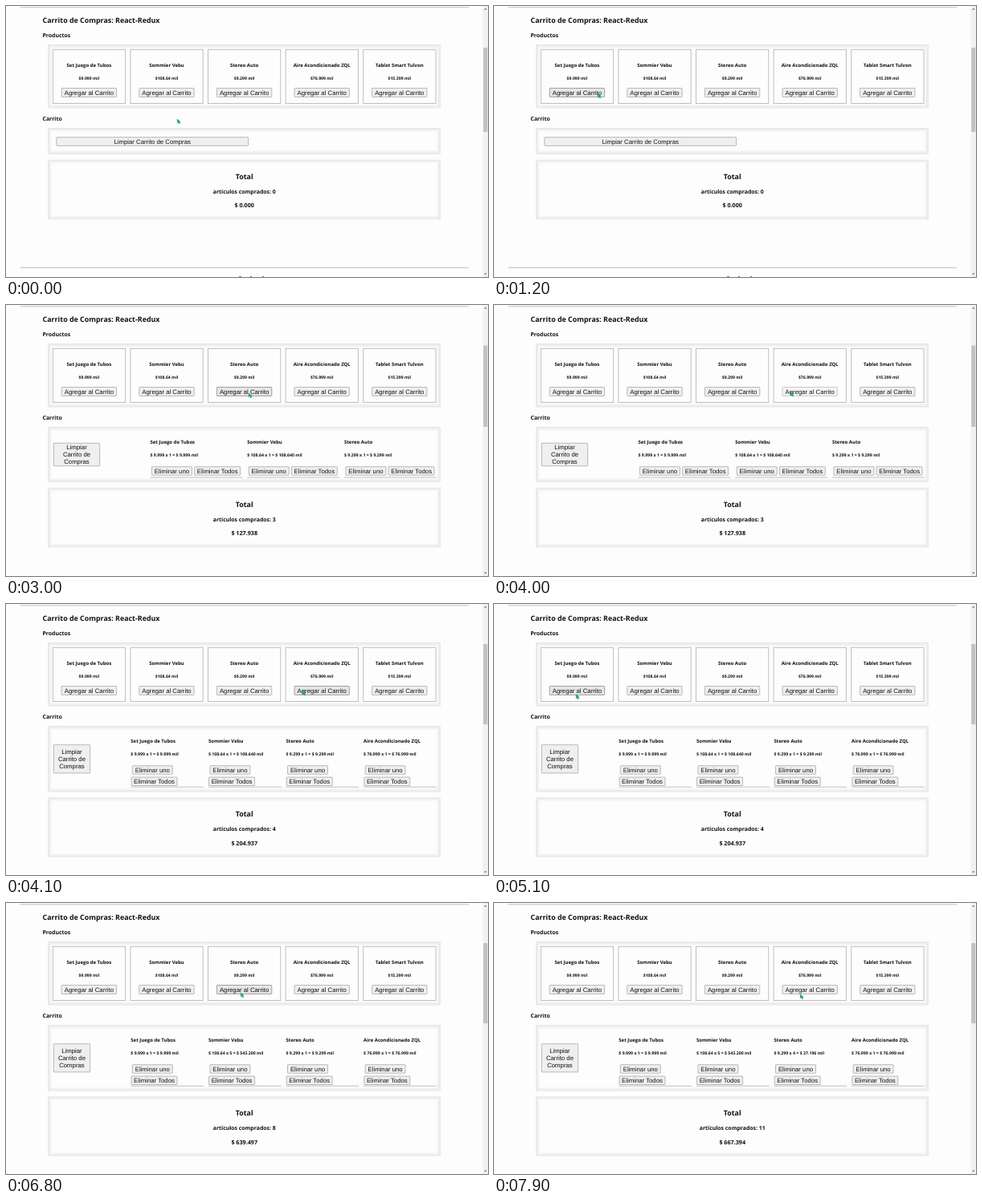
Animation, 600 px wide and 338 px high, one loop 8 s. Source, as an HTML page:

```html
<!DOCTYPE html>
<html lang="es">
<head>
<meta charset="utf-8">
<title>Carrito de Compras</title>
<style>
  html, body { margin: 0; width: 100%; height: 100%; overflow: hidden; background: #fdfdfd; }
  svg { display: block; width: 100vw; height: 100vh; }
  text {
    font-family: "Open Sans", "Noto Sans", sans-serif; font-weight: 700; fill: #111;
    text-rendering: geometricPrecision;
  }
  .btn text { font: 400 7.78px "Liberation Sans", Arial, sans-serif; text-anchor: middle; }
  .btn rect { fill: #efefef; stroke: #a0a0a0; stroke-width: .7; }
  .hover rect { fill: #e6e6e6; stroke: #808080; }
  .active rect { fill: #f5f5f5; stroke: #b8b8b8; }
  .line { fill: none; stroke: #b8b8b8; stroke-width: .9; }
</style>
</head>
<body>
<svg id="stage" viewBox="0 0 600 338"></svg>
<script>
const LOOP = 8000, STEP = 100, TRAVEL = 750, REPEAT = 150;
const PITCH = 96.6, LEFT = 58.3, INNER = 483, CENTER = 296.7;

const products = [
  ['Set Juego de Tubos', '9.999'],
  ['Sommier Vebu', '108.64'],
  ['Stereo Auto', '9.299'],
  ['Aire Acondicionado ZQL', '76.999'],
  ['Tablet Smart Tulvon', '15.399']
];

// where the pointer rests, when it gets there, and what it clicks
const visits = [
  { x: 213, y: 141, arrive: 0 },
  { x: 129, y: 109, arrive: 1000, press: 1300, hold: 100, times: 1 },
  { x: 233, y: 111, arrive: 1600, press: 1600, hold: 300, times: 1 },
  { x: 302, y: 110, arrive: 2400, press: 2800, hold: 200, times: 1 },
  { x: 369, y: 108, arrive: 3400, press: 4000, hold: 100, times: 1 },
  { x: 102, y: 112.8, arrive: 5100, bend: [0, -14] },
  { x: 205, y: 110, arrive: 6100, press: 6100, hold: 100, times: 4, bend: [355, 70] },
  { x: 292, y: 112, arrive: 6800, press: 7000, hold: 200, times: 3 },
  { x: 381, y: 113.8, arrive: 7900 }
];

const clicks = visits.flatMap(({ x, press, hold, times = 0 }) =>
  Array.from({ length: times }, (_, k) => {
    const up = press + hold + k * REPEAT;
    return { item: Math.floor((x - LEFT) / PITCH), down: up - (k ? REPEAT / 2 : hold), up };
  }));

function pointerAt(t) {
  const i = visits.findLastIndex(v => v.arrive <= t);
  const a = visits[i], b = visits[i + 1];
  if (!b) return [a.x, a.y];
  const free = a.times ? a.press + a.hold + (a.times - 1) * REPEAT : a.arrive;
  const start = Math.max(free, b.arrive - TRAVEL);
  const u = Math.max(0, (t - start) / (b.arrive - start));
  const e = u * u * (3 - 2 * u), arc = Math.sin(Math.PI * u);
  const [bx, by] = b.bend || [0, 0];
  return [a.x + (b.x - a.x) * e + bx * arc, a.y + (b.y - a.y) * e + by * arc];
}

const text = (x, y, size, str, anchor = 'start') =>
  `<text x="${x}" y="${y}" font-size="${size}" text-anchor="${anchor}">${str}</text>`;

const hline = (x0, x1, y) => `<path class="line" d="M${x0} ${y}H${x1}"/>`;

function button(x, y, w, h, lines, state = '') {
  const base = y + h / 2 + 2.8 - (lines.length - 1) * 4.5;
  return `<g class="btn ${state}"><rect x="${x}" y="${y}" width="${w}" height="${h}" rx=".6"/>` +
    lines.map((s, i) => `<text x="${x + w / 2}" y="${base + i * 9}">${s}</text>`).join('') + '</g>';
}

// box with an inner glow
function panel(y, h) {
  let out = '';
  for (let i = 0; i < 5; i++) {
    out += `<rect x="${52.5 + i}" y="${y + i + .5}" width="${488 - 2 * i}" height="${h - 1 - 2 * i}"
      fill="none" stroke="#000" stroke-opacity="${.085 * (1 - i / 5)}"/>`;
  }
  return out;
}

function shelf(t, [px, py]) {
  return products.map(([name, price], i) => {
    const x = LEFT + i * PITCH, mid = x + 45.1, bx = mid - 34.2;
    const over = Math.abs(px - mid) < 34.2 && py > 102.4 && py < 113.4;
    const down = clicks.some(c => c.item === i && t >= c.down && t < c.up);
    return `<rect class="line" x="${x}" y="54.3" width="90.3" height="67.2"/>` +
      text(mid, 75.7, 6, name, 'middle') +
      text(mid, 91.9, 5.15, `$${price} mil`, 'middle') +
      button(bx, 102.5, 68.4, 10.9, ['Agregar al Carrito'], down ? 'active' : over ? 'hover' : '');
  }).join('');
}

function cartItem(i, qty, n) {
  const col = INNER / (n + 1), x = LEFT + .4 + col * (i + 1);
  const [name, price] = products[i], wrap = n > 3;
  return text(x, 173.3, 6, name) +
    text(x, 189.4, 5.23, `$ ${price} x ${qty} = $ ${(price * qty).toFixed(3)} mil`) +
    button(x + 2, 201.7, 50, 10.5, ['Eliminar uno']) +
    button(wrap ? x + .7 : x + 55.2, wrap ? 216 : 201.7, 57, 10.5, ['Eliminar Todos']) +
    hline(x, x + col - 5.8, wrap ? 228.2 : 215);
}

// the label breaks into more lines as the columns get narrower
function clearButton(n, h) {
  if (!n) return button(62.8, 163.7, 238.7, 10.6, ['Limpiar Carrito de Compras']);
  const label = ['Limpiar Carrito de Compras', 'Limpiar Carrito de|Compras', 'Limpiar|Carrito de|Compras'];
  const inner = h - 12;
  return button(59.3, 158 + inner / 4, (INNER / (n + 1) - 6) / 2, inner / 2,
    label[Math.min(n, 3) - 1].split('|'));
}

function scrollbar(growth) {
  return `<rect x="593.5" width="6.5" height="338" fill="#f1f1f1"/>
    <rect x="594.3" y="${52 - growth * .04}" width="5" height="${105 - growth * .1}" fill="#c1c1c1"/>
    <path d="M595.2 4.6l1.6-1.8 1.6 1.8zM595.2 333.4l1.6 1.8 1.6-1.8z" fill="#555"/>`;
}

function cursor([x, y]) {
  return `<path transform="translate(${x} ${y})" d="M0 0L.3 5L1.5 4.1L2.6 6L3.8 5.4L2.8 3.6L4.2 3.2Z"
    fill="#16ad80" stroke="#0b7a5a" stroke-width=".3"/>`;
}

function render(t) {
  const qty = products.map((_, i) => clicks.filter(c => c.item === i && c.up <= t).length);
  const n = qty.filter(q => q).length;
  const count = qty.reduce((a, b) => a + b, 0);
  const sum = qty.reduce((a, q, i) => a + q * products[i][1], 0);
  const growth = n === 0 ? 0 : n < 4 ? 36 : 49.5;
  const cartH = 33 + growth, top = 158.7 + cartH;
  const tip = pointerAt(t);

  let out = hline(18, 576, 1.8) +
    text(45.5, 20.5, 8.9, 'Carrito de Compras: React-Redux') +
    text(45.5, 38.6, 6.92, 'Productos') +
    panel(48, 79.5) + shelf(t, tip) +
    text(45.5, 142.8, 6.9, 'Carrito') +
    panel(152, cartH) + clearButton(n, cartH);
  qty.forEach((q, i) => { if (q) out += cartItem(i, q, n); });
  out += panel(top, 74.5) +
    text(CENTER, top + 24, 8.9, 'Total', 'middle') +
    text(CENTER, top + 41.9, 6.9, `artículos comprados: ${count}`, 'middle') +
    text(CENTER, top + 59.3, 7.2, `$ ${sum.toFixed(3)}`, 'middle');
  if (!n) {
    out += hline(18, 576, 326.4) +
      '<path d="M290 337.5h3M304 337.5h2M319 337.5h2" stroke="#777"/>';
  }
  stage.innerHTML = out + scrollbar(growth) + cursor(tip);
}

const stage = document.getElementById('stage');
const start = performance.now();
let last = -1;
function tick() {
  const t = Math.floor((performance.now() - start) % LOOP / STEP) * STEP;
  if (t !== last) render(last = t);
  requestAnimationFrame(tick);
}
tick();
</script>
</body>
</html>
```
